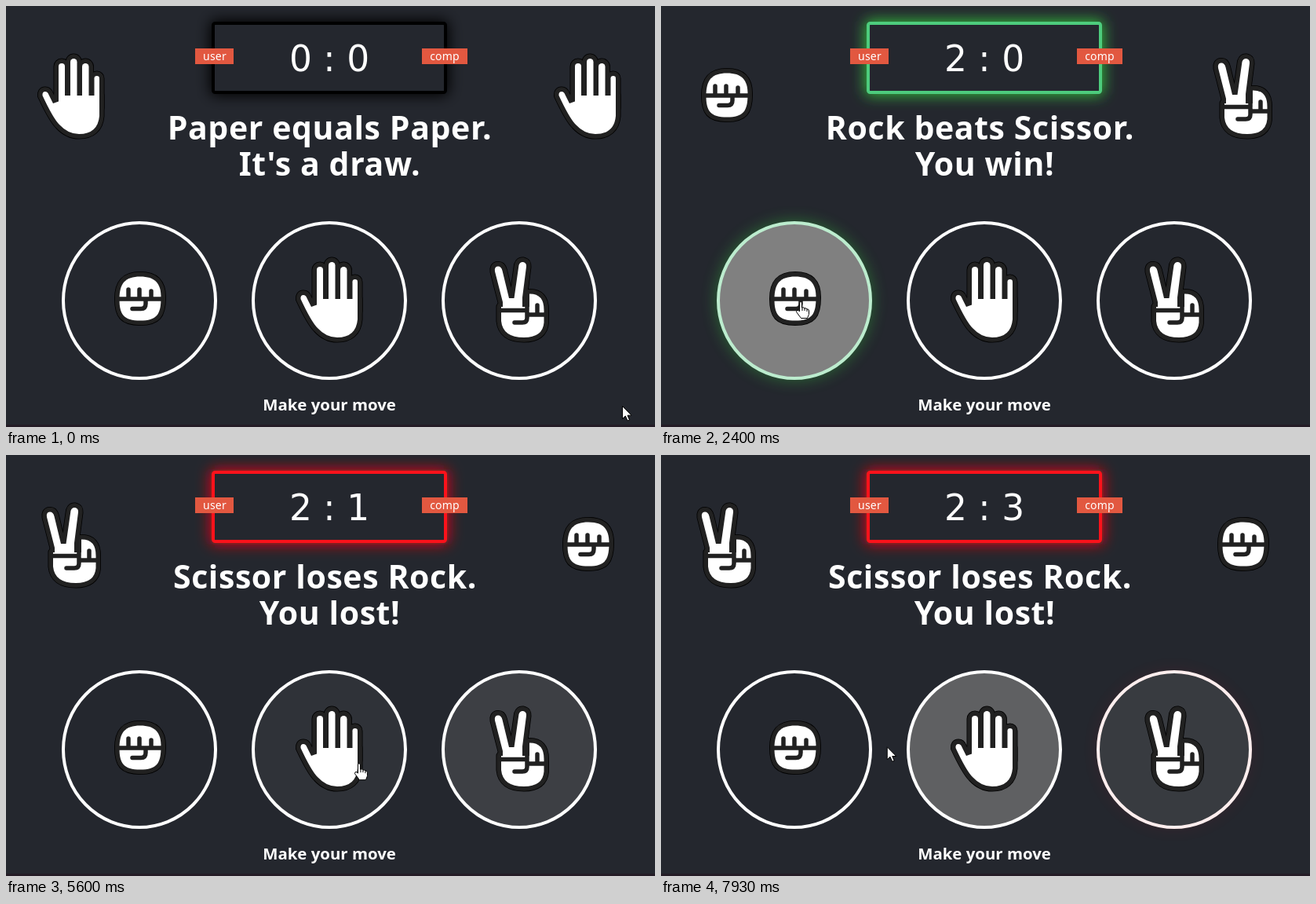
An HTML page for the animation above (8 s loop, 827 by 536 pixels).

```html
<!DOCTYPE html>
<html lang="en">
<head>
<meta charset="utf-8">
<title>Rock Paper Scissor</title>
<style>
  html, body { margin: 0; width: 100%; height: 100%; overflow: hidden; background: #24272e; }
  svg { display: block; width: 100%; height: 100%; }
  text { fill: #fff; font-family: "Noto Sans", "Open Sans", sans-serif; text-anchor: middle; }
  .msg { font-size: 41px; font-weight: 700; letter-spacing: .6px; }
  .score { font-size: 45.5px; font-family: "DejaVu Sans", sans-serif; }
  .tag { font-size: 14px; font-weight: 500; letter-spacing: .2px; }
  .hint { font-size: 20.4px; font-weight: 700; }
  .edge { fill: #000; stroke: #000; stroke-width: 13; stroke-linejoin: round; }
  .rim { fill: #212121; stroke: #212121; stroke-width: 11.4; stroke-linejoin: round; }
  .skin { fill: #fff; }
  .line { fill: none; stroke: #212121; stroke-width: 5.5; stroke-linecap: round; stroke-linejoin: round; }
  .cursor { fill: #fff; stroke: #000; stroke-width: 1; }
</style>
</head>
<body>
<svg viewBox="0 0 827 536" preserveAspectRatio="none">
  <defs>
    <filter id="blur" x="-30%" y="-50%" width="160%" height="200%"><feGaussianBlur stdDeviation="9"/></filter>

    <g id="paper-shape">
      <rect x="28" y="13" width="8" height="54" rx="4"/>
      <rect x="43" y="7" width="8.500" height="60" rx="4.200"/>
      <rect x="58" y="13" width="8.500" height="54" rx="4.200"/>
      <rect x="73.500" y="29" width="6.500" height="44" rx="3.200"/>
      <path d="M7.500 54Q7 49 11 49Q14 49 15.500 53L21 64L28 61.500V54H80V80Q78 103 54 103Q40 103 29 91Q21 83 7.500 54Z"/>
    </g>
    <g id="rock-shape">
      <path d="M45 25.500C64 25.500 71.500 34 71.500 52C71.500 74 66 81.500 45 81.500C24 81.500 18.500 74 18.500 54C18.500 34 26 25.500 45 25.500Z"/>
    </g>
    <g id="scissor-shape">
      <path d="M13 19Q12 13 16.500 12.500Q21 12 22.500 18L31 53H37.500L43.500 11Q45 6.500 49 7Q53.500 8 53 13L48 52V66H23V58Z"/>
      <path d="M21 64H57V47.500Q75.500 47 75.500 68V84Q74 103 50 103Q23 103 21 82Z"/>
    </g>

    <g id="paper">
      <use href="#paper-shape" class="edge"/><use href="#paper-shape" class="rim"/><use href="#paper-shape" class="skin"/>
    </g>
    <g id="rock">
      <use href="#rock-shape" class="edge"/><use href="#rock-shape" class="rim"/><use href="#rock-shape" class="skin"/>
      <path class="line" d="M17 54H73M30 42V53M44 42V53M59 44V53M35 66.500H46Q52 66.500 52 60V55"/>
    </g>
    <g id="scissor">
      <use href="#scissor-shape" class="edge"/><use href="#scissor-shape" class="rim"/><use href="#scissor-shape" class="skin"/>
      <path class="line" d="M20 68.500H54V46M55 74H77M67 62V73M38 84H48Q54 84 54 78V70"/>
    </g>
  </defs>

  <rect width="827" height="536" fill="#24272e"/>
  <rect y="533" width="827" height="3" fill="#241c26"/>

  <rect id="boardGlow" x="260" y="18" width="304" height="96" rx="6" filter="url(#blur)"/>
  <rect id="board" x="264" y="22" width="296" height="88" rx="2.500" fill="#24272e" stroke-width="4"/>
  <rect x="241" y="54" width="49" height="20" fill="#e25840"/>
  <rect x="530" y="54" width="58" height="20" fill="#e25840"/>
  <text class="tag" x="266" y="69">user</text>
  <text class="tag" x="559" y="69">comp</text>
  <text class="score" id="score" x="412" y="83"></text>

  <text class="msg" id="line1" y="170"></text>
  <text class="msg" id="line2" x="412.500" y="216"></text>
  <use id="userPick" x="39" y="60"/>
  <use id="compPick" x="697" y="60"/>

  <g id="choices"></g>
  <text class="hint" x="412" y="515">Make your move</text>

  <path id="arrow" class="cursor" d="M.5 .5V16.500L4.300 13L7 19L9.500 18L7 12.200H12Z"/>
  <path id="hand" class="cursor" d="M-1.500 1.500Q0 -.5 1.500 1.500V8Q4.500 7 5 9Q7.500 8 8 10Q10.500 9.500 10.500 12V16.500L8.500 21.500H.5L-5.500 13.500Q-5.500 10.500 -3 11.500L-1.500 13ZM2 8V12M5 9V12M8 10V13"/>
</svg>

<script>
const LOOP = 8000, FADE = 300, HOLD = 260;
const $ = id => document.getElementById(id);

const BG = [36, 39, 46], GRAY = [128, 128, 128], WHITE = [255, 255, 255], BLACK = [0, 0, 0];
const NAMES = ['Rock', 'Paper', 'Scissor'];
const [ROCK, PAPER, SCISSOR] = NAMES.keys();

// Indexed by (user - comp) mod 3
const OUTCOMES = [
  { verb: 'equals', end: "It's a draw.", edge: BLACK, glow: BLACK, shift: 0 },
  { verb: 'beats', end: 'You win!', edge: [77, 204, 125], glow: [49, 180, 58], shift: -6 },
  { verb: 'loses', end: 'You lost!', edge: [252, 18, 27], glow: [208, 17, 21], shift: -6 }
];

const tally = [0, 0, 0];
const rounds = [
  [-FADE * 2, PAPER, PAPER],
  [1130, PAPER, ROCK],
  [2330, ROCK, SCISSOR],
  [3530, ROCK, ROCK],
  [5000, SCISSOR, ROCK],
  [6200, PAPER, SCISSOR],
  [7470, SCISSOR, ROCK]
].map(([at, user, comp]) => {
  const result = (user - comp + 3) % 3;
  tally[result]++;
  return { at, user, comp, look: OUTCOMES[result], score: `${tally[1]} : ${tally[2]}` };
});

// Pointer moves: start, end, and the resting point reached
const HOME = [785, 509];
const moves = [
  [70, 600, [368, 380]],
  [1450, 1860, [178, 376]],
  [4200, 4345, [645, 399]],
  [5400, 5500, [533, 396]],
  [5540, 5610, [446, 392]],
  [6440, 6860, [648, 399]],
  [7710, 7945, [284, 371]]
];

const clamp = v => Math.min(1, Math.max(0, v));
const smooth = s => s * s * (3 - 2 * s);
const mix = (a, b, k) => a.map((v, i) => v + (b[i] - v) * k);
const rgb = c => `rgb(${c.map(Math.round)})`;

// CSS "ease": cubic-bezier(.25, .1, .25, 1)
function ease(x) {
  x = clamp(x);
  const curve = (s, p1, p2) => 3 * s * (1 - s) ** 2 * p1 + 3 * s * s * (1 - s) * p2 + s ** 3;
  let lo = 0, hi = 1;
  for (let i = 0; i < 18; i++) {
    const mid = (lo + hi) / 2;
    if (curve(mid, .25, .25) < x) lo = mid; else hi = mid;
  }
  return curve(hi, .1, 1);
}

// Fades in at the start time and out again at the end time
const pulse = (t, start, end) => ease((t - start) / FADE) * (1 - ease((t - end) / FADE));

const pointer = t => moves.reduce(
  (p, [start, end, to]) => mix(p, to, smooth(clamp((t - start) / (end - start)))), HOME);

const inside = (c, [x, y]) => ((x - c.cx) / 99) ** 2 + ((y - 375) / 101) ** 2 < 1;

const choices = NAMES.map((name, i) => {
  const cx = 170 + 242 * i;
  const g = document.createElementNS('http://www.w3.org/2000/svg', 'g');
  g.innerHTML = `<ellipse cx="${cx}" cy="375" rx="101" ry="103" filter="url(#blur)"/>
    <ellipse cx="${cx}" cy="375" rx="97" ry="99" stroke-width="4"/>
    <use href="#${name.toLowerCase()}" x="${cx - 44}" y="319"/>`;
  $('choices').append(g);
  return { cx, glow: g.children[0], ring: g.children[1], visits: [] };
});

// Follow the pointer once to find when it enters and leaves each choice
for (let t = 0; t <= LOOP; t += 2) {
  const p = pointer(t);
  for (const c of choices) {
    const on = inside(c, p);
    if (on && !c.on) c.visits.push([t, Infinity]);
    if (!on && c.on) c.visits[c.visits.length - 1][1] = t;
    c.on = on;
  }
}

function setText(id, s) {
  if ($(id).textContent !== s) $(id).textContent = s;
}

function draw(t) {
  const n = rounds.filter(r => r.at <= t).length - 1;
  const now = rounds[n], before = rounds[Math.max(0, n - 1)];
  const look = now.look;

  const k = ease((t - now.at) / FADE);
  $('board').setAttribute('stroke', rgb(mix(before.look.edge, look.edge, k)));
  $('boardGlow').setAttribute('fill', rgb(mix(before.look.glow, look.glow, k)));
  setText('score', now.score);
  setText('line1', `${NAMES[now.user]} ${look.verb} ${NAMES[now.comp]}.`);
  setText('line2', look.end);
  $('line1').setAttribute('x', 412.5 + look.shift);
  $('userPick').setAttribute('href', '#' + NAMES[now.user].toLowerCase());
  $('compPick').setAttribute('href', '#' + NAMES[now.comp].toLowerCase());

  choices.forEach(({ glow, ring, visits }, i) => {
    const flash = i === now.user ? pulse(t, now.at, now.at + HOLD) : 0;
    const hover = Math.max(0, ...visits.map(([a, b]) => pulse(t, a, b)));
    glow.setAttribute('fill', rgb(look.glow));
    glow.setAttribute('opacity', flash);
    ring.setAttribute('fill', rgb(mix(BG, GRAY, hover)));
    ring.setAttribute('stroke', rgb(mix(WHITE, look.edge, flash)));
  });

  const p = pointer(t);
  const over = choices.some(c => inside(c, p));
  for (const [id, shown] of [['arrow', !over], ['hand', over]]) {
    $(id).setAttribute('transform', `translate(${p})`);
    $(id).setAttribute('visibility', shown ? 'visible' : 'hidden');
  }
}

const begin = performance.now();
function tick() {
  draw((performance.now() - begin) % LOOP);
  requestAnimationFrame(tick);
}
tick();
</script>
</body>
</html>
```
